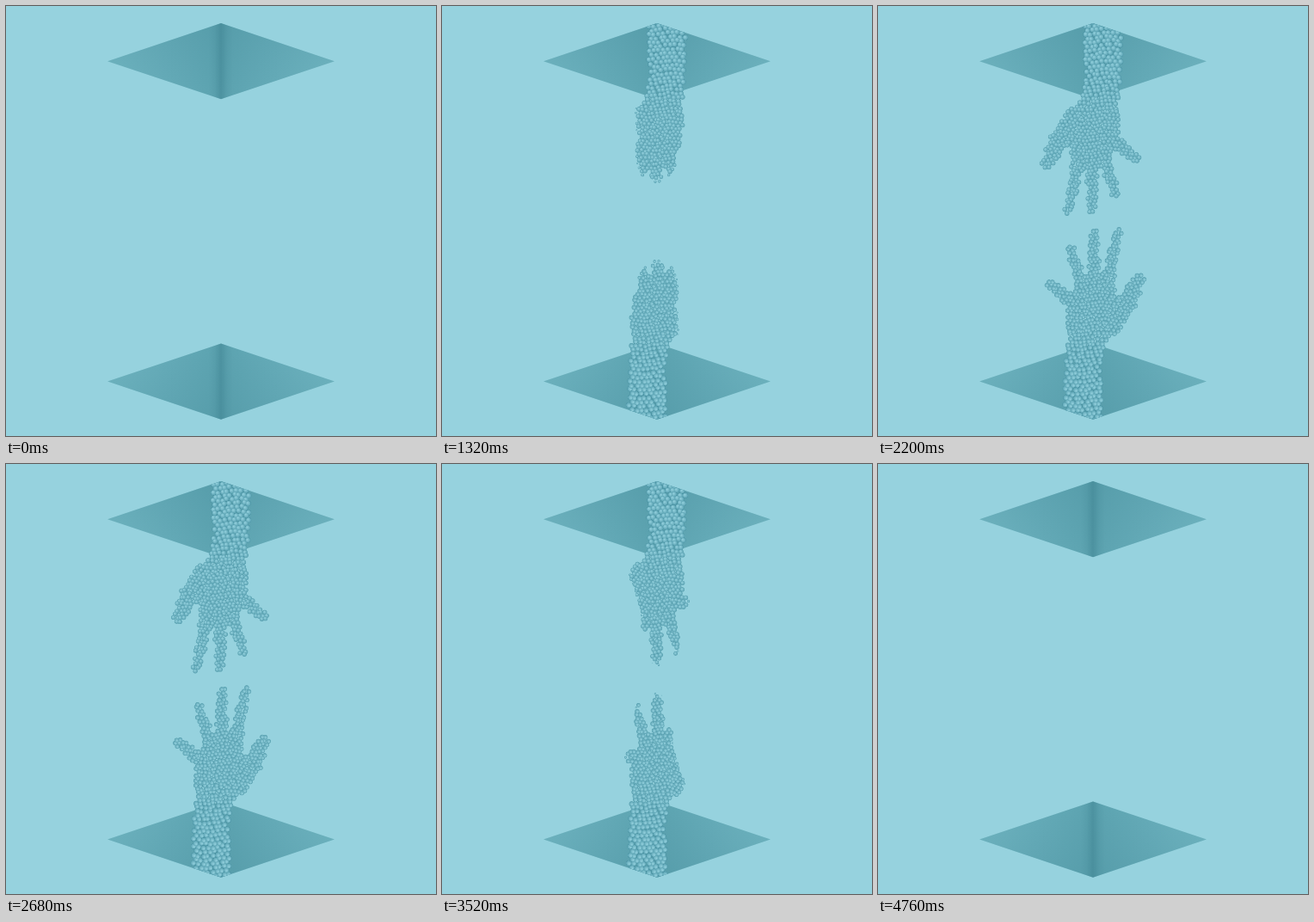
These frames come from a looping animation (500x500 px, 4800 ms). An HTML page with a canvas:

```html
<!DOCTYPE html>
<html lang="en">
<head>
<meta charset="utf-8">
<title>Reaching hands</title>
<style>
  html, body { margin: 0; width: 100%; height: 100%; overflow: hidden; background: #96d2de; }
  canvas { display: block; width: 500px; height: 500px; }
</style>
</head>
<body>
<canvas id="stage" width="500" height="500"></canvas>
<script>
const LOOP = 4800, STEP = 40, MID = 250;
const ctx = document.getElementById('stage').getContext('2d');

const clamp = (v, a = 0, b = 1) => Math.min(b, Math.max(a, v));
const smooth = v => { v = clamp(v); return v * v * (3 - 2 * v); };

let seed = 7;
const rnd = () => {
  seed = (seed * 1664525 + 1013904223) % 4294967296;
  return seed / 4294967296;
};
const between = (a, b) => a + (b - a) * rnd();

// Upper hand as chains of x, y, radius: arm with palm, thumb, then four fanned fingers
const limbs = [
  [[262, 8, 23.5], [261.5, 88, 22.5], [257, 115, 24], [252, 142, 31], [248.5, 167, 27]],
  [[236, 131, 19], [209, 159, 13], [195, 185, 8]]
];
for (let i = 0; i < 4; i++) {
  const sq = i * i;
  limbs.push([
    [233 + 17.5 * i - 1.6 * sq, 178 + 4.5 * i - 4.2 * sq, 9.5],
    [222 + 27.5 * i - 0.4 * sq, 237 + 9 * i - 9.4 * sq, 6.5]
  ]);
}

// Signed distance to a tapered segment
function segDist(x, y, [ax, ay, ar], [bx, by, br]) {
  const dx = bx - ax, dy = by - ay;
  const k = clamp(((x - ax) * dx + (y - ay) * dy) / (dx * dx + dy * dy));
  return Math.hypot(x - ax - dx * k, y - ay - dy * k) - (ar + (br - ar) * k);
}

function handDist(x, y) {
  let d = Infinity;
  for (const limb of limbs)
    for (let i = 1; i < limb.length; i++)
      d = Math.min(d, segDist(x, y, limb[i - 1], limb[i]));
  return d;
}

// How far a front must travel to reach a point: down the core first, then sideways
function reach(x, y, core, width, spread) {
  const off = Math.abs(x - core);
  const side = off < width ? 35 * (off / width) ** 4 : 35 + spread * Math.sqrt(off - width);
  return y + side + between(0, 4);
}

// Jittered rows of beads, coarser on the arm than on the hand
const beads = [];
function fillHand() {
  let odd = 0, gap;
  for (let row = 8; row < 248; row += gap * 0.87) {
    gap = 5.5 - 1.0 * smooth((row - 70) / 70);
    odd = gap / 2 - odd;
    for (let col = 180 + odd; col < 312; col += gap) {
      const x = col + between(-0.8, 0.8);
      const y = row + between(-0.8, 0.8) + 1.5 * Math.sin(col / 9);
      if (handDist(x, y) > -1.9) continue;
      const onThumb = y > 100 && y < 200 - (x - 190) * 0.7;
      beads.push({
        x, y,
        r: gap * 0.56,
        grow: reach(x, y, 262 - 13 * clamp((y - 60) / 125), 25, 21),
        fade: reach(x, y, 262 - 6 * clamp((y - 80) / 90), 22, 13),
        thumb: onThumb ? clamp((235 - x) / 40) : 0,
        phase: between(0, 6.28)
      });
    }
    odd = odd > 0 ? gap / 2 : 0;
  }
}

// A few loose specks while the arm grows and while it crumbles
const specks = [];
function addSpecks() {
  for (let i = 0; i < 6; i++)
    specks.push({
      x: between(220, 270),
      y: between(145, 190),
      start: (i % 2 ? 3800 : 560) + between(0, 200)
    });
}

function makeSprite() {
  const c = document.createElement('canvas');
  c.width = c.height = 32;
  const g = c.getContext('2d');
  const fill = g.createRadialGradient(12, 11, 1, 16, 16, 16);
  fill.addColorStop(0, '#90cfdc');
  fill.addColorStop(0.4, '#7fc0ce');
  fill.addColorStop(1, '#5ba3b3');
  g.fillStyle = fill;
  g.beginPath();
  g.arc(16, 16, 15.5, 0, 7);
  g.fill();
  return c;
}
const sprite = makeSprite();

function poly(points) {
  ctx.beginPath();
  points.forEach(([x, y]) => ctx.lineTo(x, y));
  ctx.closePath();
}

function blend(x0, y0, x1, y1, ...colors) {
  const g = ctx.createLinearGradient(x0, y0, x1, y1);
  colors.forEach((c, i) => g.addColorStop(i / (colors.length - 1), c));
  return g;
}

// One wall of the hole; the crease softens once the arm fills it
function wall(side, crease) {
  const corner = MID + side * 132;
  poly([[MID, 20], [corner, 64.3], [MID, 108.3]]);
  ctx.fillStyle = blend(MID, 0, corner, 0, '#5ca3b0', '#66acb9', '#70b5c1');
  ctx.fill();
  ctx.fillStyle = blend(MID, 0, MID + side * 14, 0,
    `rgba(58,126,141,${0.45 * crease})`, `rgba(58,126,141,${0.13 * crease})`, 'rgba(58,126,141,0)');
  ctx.fill();
  ctx.fillStyle = blend(0, 20, 0, 108, 'rgba(58,126,141,0.18)', 'rgba(58,126,141,0)');
  ctx.fill();
}

const growFront = t => 87 + (t - 640) * (t < 640 ? 0.1286 : 0.1765);
const fadeFront = t => 167 - (t - 3920) * 0.1726;

function hand(t) {
  const front = growFront(t), back = fadeFront(t);
  const bend = smooth((t - 2280) / 820);
  const live = [];
  for (const b of beads) {
    const s = Math.min(clamp((front - b.grow) / 7), clamp((back - b.fade) / 7));
    if (s <= 0) continue;
    const a = b.phase + t / LOOP * Math.PI * 4;
    live.push([
      b.x + b.thumb * 8 * bend + Math.cos(a) * 0.4,
      b.y - b.thumb * 10 * bend + Math.sin(a) * 0.4,
      b.r * Math.sqrt(s)
    ]);
  }
  ctx.fillStyle = blend(0, 60, 0, 150, '#4a92a2', '#579fae');
  ctx.beginPath();
  for (const [x, y, r] of live) {
    ctx.moveTo(x + r * 1.05, y);
    ctx.arc(x, y, r * 1.05, 0, 6.2832);
  }
  ctx.fill();
  for (const [x, y, r] of live) ctx.drawImage(sprite, x - r, y - r, r * 2, r * 2);

  ctx.fillStyle = '#7ab7c5';
  for (const s of specks) {
    if (t < s.start || t > s.start + 160) continue;
    ctx.beginPath();
    ctx.ellipse(s.x, s.y, 1.6, 0.9, 0, 0, 7);
    ctx.fill();
  }
}

function half(t) {
  const crease = 1 - smooth((Math.min(growFront(t), fadeFront(t)) - 20) / 140);
  ctx.save();
  wall(-1, crease);
  wall(1, crease);
  poly([[118, 64.3], [MID, 20], [382, 64.3], [382, 300], [118, 300]]);
  ctx.clip();
  hand(t);
  ctx.restore();
}

function draw(t) {
  ctx.fillStyle = '#96d2de';
  ctx.fillRect(0, 0, 500, 500);
  half(t);
  ctx.save();
  ctx.translate(2 * MID, 500.8);
  ctx.rotate(Math.PI);
  half(t);
  ctx.restore();
}

function tick() {
  const t = performance.now() % LOOP;
  draw(Math.floor(t / STEP) * STEP);
  requestAnimationFrame(tick);
}

fillHand();
addSpecks();
tick();
</script>
</body>
</html>
```
